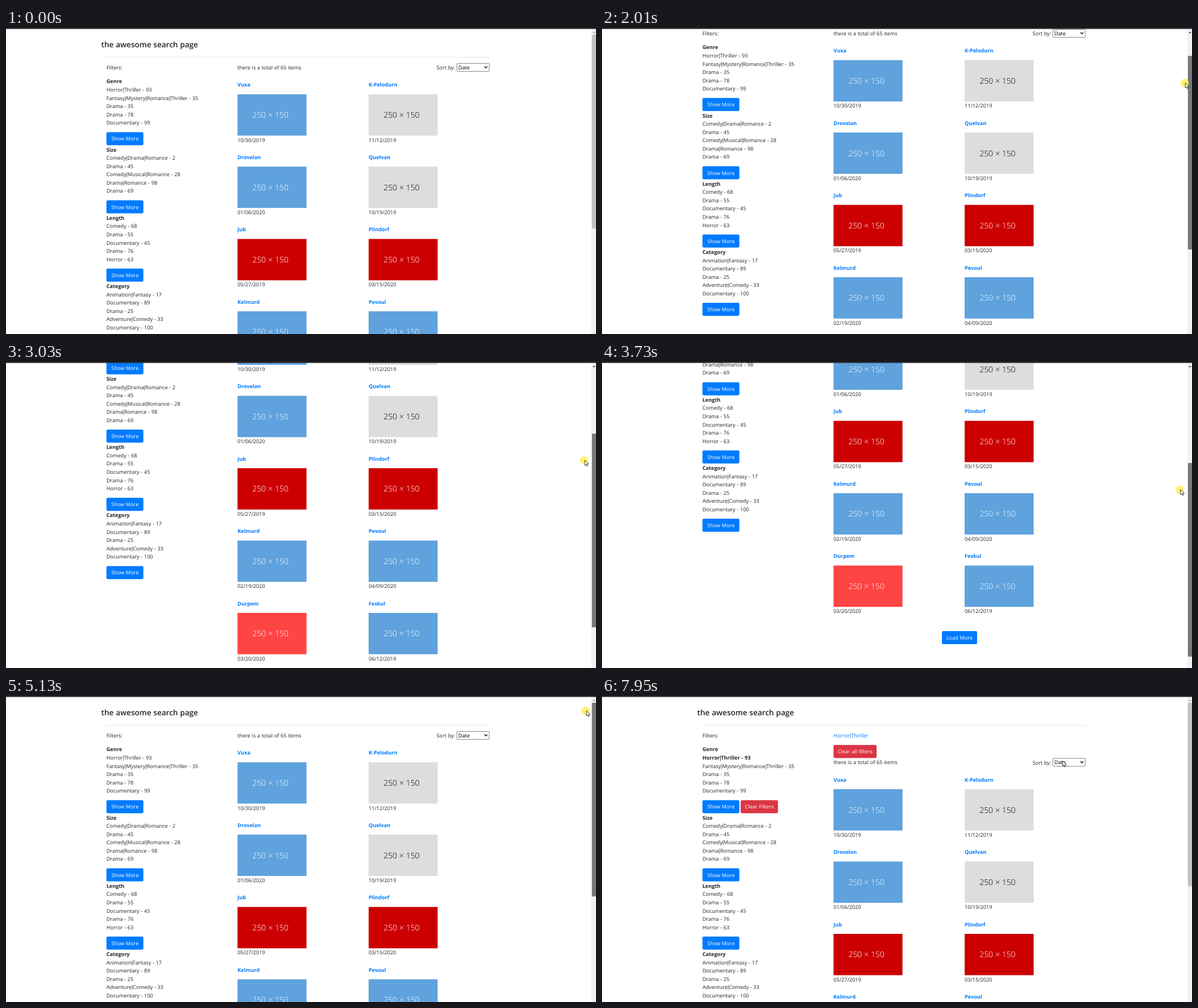
An HTML page with a canvas that plays this animation: 1038x539 px, repeating every 8000 ms.

```html
<!DOCTYPE html>
<html lang="en">
<head>
<meta charset="utf-8">
<title>Search page</title>
<style>
html, body { margin: 0; width: 100%; height: 100%; overflow: hidden; background: #fff; }
canvas { display: block; width: 1038px; height: 539px; }
</style>
</head>
<body>
<canvas id="stage" width="1038" height="539"></canvas>
<script>
const ctx = document.getElementById('stage').getContext('2d');
const LOOP = 8000, W = 1038, H = 539;

// The picture advances in ticks, like a screen recording.
const TICK = 78.2, TICK_START = 42;
const PRESS = 19, RELEASE = 66, CLICK = 82, FILTERED = 84;

// Page measures, in stage pixels.
const LEFT = 176.7, COL = 407.3, COL_STEP = 230.7;
const LINE = 14.57, ROW = 127.45, GROUP = 120.2, FILTER_SHIFT = 47.4;
const GRAB_Y = 56.5, SCROLL_RATIO = 1.615, SCROLL_LAG = 0.31;

const INK = '#212529', LINK = '#007bff', DANGER = '#dc3545';
const BLUE = '#5fa2dd', GREY = '#dddddd', RED = '#cc0000', CORAL = '#ff4444';
const SANS = '"Open Sans", "Noto Sans", sans-serif';

const linear = p => p;
const smooth = p => p * p * (3 - 2 * p);
const slowing = p => 1 - (1 - p) ** 1.7;

// Pointer tip at key ticks, with the easing that leads there.
const MOVES = [
  [2, 826, 545],
  [13, 1015, 71, smooth],
  [19, 1027, 57, smooth],
  [20, 1027, 57, linear],
  [25, 1026, 96.1, linear],
  [38, 1018, 172.6, linear],
  [50, 1017.3, 241.4, linear],
  [52, 1017.3, 241.4, linear],
  [65, 1020.8, 25.5, slowing],
  [67, 1020, 25.5, linear],
  [78, 201, 111, smooth],
  [80, 202, 105.5, linear],
  [93, 202, 105.5, linear],
  [101, 810, 114, smooth]
];

const GROUPS = [
  ['Genre', 'Horror|Thriller - 93', 'Fantasy|Mystery|Romance|Thriller - 35',
    'Drama - 35', 'Drama - 78', 'Documentary - 99'],
  ['Size', 'Comedy|Drama|Romance - 2', 'Drama - 45', 'Comedy|Musical|Romance - 28',
    'Drama|Romance - 98', 'Drama - 69'],
  ['Length', 'Comedy - 68', 'Drama - 55', 'Documentary - 45', 'Drama - 76', 'Horror - 63'],
  ['Category', 'Animation|Fantasy - 17', 'Documentary - 89', 'Drama - 25',
    'Adventure|Comedy - 33', 'Documentary - 100']
];

const ITEMS = [
  ['Vuxa', BLUE, '10/30/2019'], ['K-Pelodurn', GREY, '11/12/2019'],
  ['Drovelan', BLUE, '01/06/2020'], ['Quelvan', GREY, '10/19/2019'],
  ['Jub', RED, '05/27/2019'], ['Plindorf', RED, '03/15/2020'],
  ['Kelmurd', BLUE, '02/19/2020'], ['Pevoul', BLUE, '04/09/2020'],
  ['Durpem', CORAL, '03/20/2020'], ['Feskul', BLUE, '06/12/2019']
];

const within = (tick, from, to) => tick >= from && tick < to;

function pointerAt(tick) {
  const i = MOVES.findIndex(m => m[0] > tick);
  const [start, x0, y0] = MOVES.at(i < 0 ? -1 : Math.max(0, i - 1));
  if (i < 1) return [x0, y0];
  const [end, x1, y1, ease] = MOVES[i];
  const p = ease((tick - start) / (end - start));
  return [x0 + (x1 - x0) * p, y0 + (y1 - y0) * p];
}

// The page follows the dragged thumb, a little behind the pointer.
function scrollAt(tick) {
  if (!within(tick, PRESS, RELEASE)) return 0;
  const y = pointerAt(tick - SCROLL_LAG)[1];
  return tick <= 20 ? 0 : Math.max(0, (y - GRAB_Y) * SCROLL_RATIO);
}

function rect(x, y, w, h, color) {
  ctx.fillStyle = color;
  ctx.fillRect(x, y, w, h);
}

function polyline(points) {
  ctx.beginPath();
  points.forEach(([x, y]) => ctx.lineTo(x, y));
}

// Draws text, setting vertical bars tighter than the font does.
function text(str, x, y, color = INK, weight = 400, size = 9.15) {
  ctx.font = `${weight} ${size}px ${SANS}`;
  ctx.fillStyle = color;
  const barWidth = ctx.measureText('|').width, barStep = size * 0.23;
  str.split('|').forEach((part, i) => {
    if (i) {
      ctx.fillText('|', x - (barWidth - barStep) / 2, y);
      x += barStep;
    }
    ctx.fillText(part, x, y);
    x += ctx.measureText(part).width;
  });
}

function button(label, x, y, w, color = LINK) {
  ctx.fillStyle = color;
  ctx.beginPath();
  ctx.roundRect(x, y, w, 23, 2.4);
  ctx.fill();
  ctx.textAlign = 'center';
  text(label, x + w / 2, y + 15, '#fff');
  ctx.textAlign = 'left';
}

function drawFilters(filtered) {
  text('Filters:', LEFT, 73);
  GROUPS.forEach(([title, ...lines], g) => {
    const y = 97.4 + g * GROUP;
    text(title, LEFT, y, INK, 700);
    lines.forEach((line, i) => {
      const chosen = filtered && g + i === 0;
      text(line, LEFT, y + (i + 1) * LINE, INK, chosen ? 700 : 400);
    });
    button('Show More', LEFT, y + 86, 65);
  });
  if (filtered) button('Clear Filters', 244, 183.4, 65.6, DANGER);
}

function drawSort(y) {
  text('Sort by:', 757.5, y + 11.2);
  ctx.strokeStyle = '#767676';
  ctx.lineWidth = 0.9;
  ctx.beginPath();
  ctx.roundRect(793.2, y + 0.4, 57, 14, 1.2);
  ctx.stroke();
  text('Date', 795.8, y + 11, '#000');
  ctx.strokeStyle = '#000';
  ctx.lineWidth = 1.3;
  polyline([[841.8, y + 5.8], [844.3, y + 8.4], [846.8, y + 5.8]]);
  ctx.stroke();
}

function drawItem([name, color, date], i) {
  const x = COL + (i % 2) * COL_STEP;
  const y = 116.7 + Math.floor(i / 2) * ROW;
  text(name, x, y - 13.4, LINK, 700);
  rect(x, y, 121.4, 72.8, color);
  text('250 × 150', x + 26.2, y + 41.4, color === GREY ? '#000' : '#fff', 300, 13.9);
  text(date, x, y + 83.8);
}

function drawResults(filtered) {
  ctx.save();
  if (filtered) {
    text('Horror|Thriller', COL, 73, LINK);
    button('Clear all filters', COL, 86.2, 75.8, DANGER);
    ctx.translate(0, FILTER_SHIFT);
  }
  text('there is a total of 65 items', COL, 73);
  drawSort(62);
  ITEMS.forEach(drawItem);
  button('Load More', 598, 742, 62);
  ctx.restore();
}

function drawScrollbar(tick, scroll, filtered) {
  const pressed = within(tick, PRESS, RELEASE), hover = within(tick, 16, PRESS);
  rect(1029.8, 2, W - 1029.8, H - 2, '#f1f1f1');
  rect(1030.8, 12 + scroll / SCROLL_RATIO, W - 1030.8, filtered ? 323 : 341,
    pressed ? '#787878' : hover ? '#a8a8a8' : '#c1c1c1');
  ctx.fillStyle = scroll > 0 ? '#404040' : '#a3a3a3';
  polyline([[1032, 9], [1034.4, 6.2], [1036.8, 9]]);
  ctx.fill();
}

function drawPointer(tick) {
  const [x, y] = pointerAt(tick);
  ctx.save();
  ctx.translate(x, y);
  if (within(tick, PRESS, RELEASE) || within(tick, CLICK, FILTERED)) {
    ctx.fillStyle = 'rgba(255, 235, 50, 0.7)';
    ctx.beginPath();
    ctx.arc(-0.8, 0.8, 7.3, 0, Math.PI * 2);
    ctx.fill();
  }
  polyline([[0.3, 0.4], [0.3, 9.6], [2.4, 7.6], [3.9, 11], [5.4, 10.3], [4, 7.1], [7, 7.1]]);
  ctx.closePath();
  ctx.fillStyle = '#fff';
  ctx.fill();
  ctx.strokeStyle = '#111';
  ctx.lineWidth = 0.8;
  ctx.stroke();
  ctx.restore();
}

function draw(time) {
  const tick = Math.floor((time - TICK_START) / TICK);
  const scroll = scrollAt(tick);
  const filtered = tick >= FILTERED;
  ctx.textRendering = 'geometricPrecision';
  ctx.wordSpacing = '0.3px';
  rect(0, 0, W, H, '#fff');
  ctx.save();
  ctx.translate(0, -scroll);
  text('the awesome search page', 167.6, 34.4, INK, 600, 13.55);
  rect(LEFT, 51.2, 674, 0.8, 'rgba(0, 0, 0, 0.12)');
  drawFilters(filtered);
  drawResults(filtered);
  ctx.restore();
  drawScrollbar(tick, scroll, filtered);
  rect(0, 0, W, 1.7, '#2b2b2b');
  drawPointer(tick);
}

const began = performance.now();
function frame() {
  draw((performance.now() - began) % LOOP);
  requestAnimationFrame(frame);
}
frame();
</script>
</body>
</html>
```
